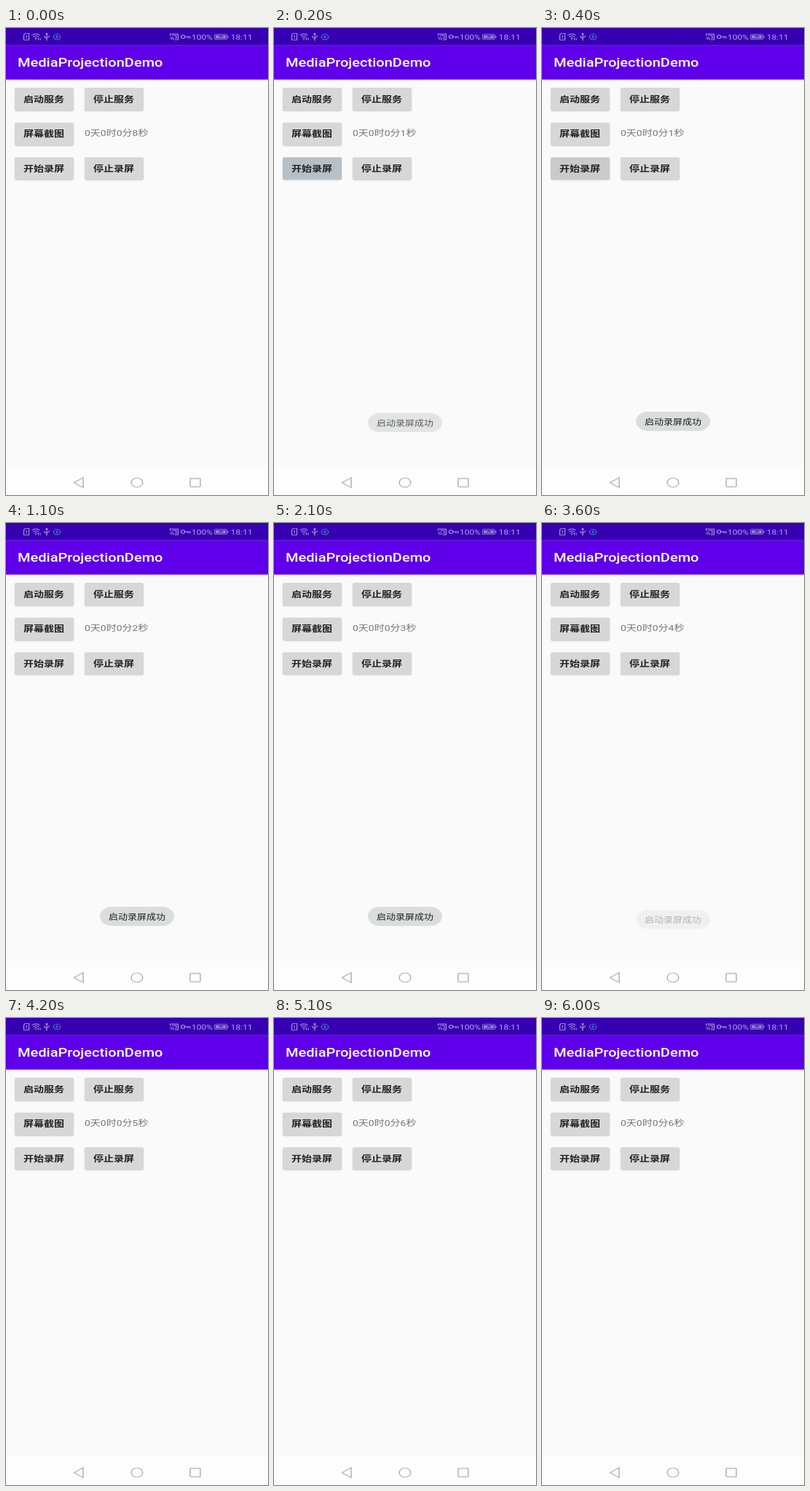
An HTML page for the animation above (6.8 s loop, 360 by 640 pixels).

```html
<!DOCTYPE html>
<html lang="zh-CN">
<head>
<meta charset="utf-8">
<title>MediaProjectionDemo</title>
<style>
@property --sec { syntax: "<integer>"; inherits: false; initial-value: 8; }

html, body { margin: 0; width: 100%; height: 100%; overflow: hidden; background: #fafafa; }

/* A 360 x 780 phone screen, squeezed to the height of the stage */
.screen {
  position: absolute; left: 0; top: 0; width: 360px; height: 780px;
  transform: scaleY(.820513); transform-origin: 0 0;
  font-family: Roboto, "Noto Sans CJK SC", "Noto Sans CJK", sans-serif;
}
.screen > * { position: absolute; box-sizing: border-box; white-space: nowrap; }

.bar {
  left: 0; top: 29.25px; width: 360px; height: 57px; padding-left: 16px;
  background: #6000eb; color: #fff; font-size: 20px; font-weight: 500; line-height: 59px;
  box-shadow: 0 1px 4px rgba(0, 0, 0, .4);
}
.status { left: 0; top: 0; width: 360px; height: 29.25px; background: #3700b3; }
.status text { fill: #b3a8e2; font-size: 12px; }
.nav { left: 0; top: 732px; width: 360px; height: 48px; background: #fdfdfd; }

.button {
  width: 81px; height: 37.5px; border-radius: 2.5px; background: #d6d7d7;
  color: #212121; font-size: 14px; font-weight: 700; line-height: 39px; text-align: center;
  box-shadow: 0 1px 2px rgba(0, 0, 0, .2);
}
.left { left: 11.5px; }
.right { left: 107.5px; }
.row1 { top: 100px; }
.row2 { top: 158px; }
.row3 { top: 215.5px; }
.press { animation: press 6.8s step-end infinite; }

.timer { left: 108px; top: 164.5px; color: #757575; font-size: 14px; line-height: 20px; }
.sec { counter-reset: sec var(--sec); animation: tick 6.8s step-end infinite; }
.sec::after { content: counter(sec); }

.toast {
  left: 129px; top: 641px; width: 102px; height: 32px; border-radius: 16px;
  background: #dadddd; color: #1c1c1c; font-size: 13px; line-height: 33px; text-align: center;
  opacity: 0; animation: toast 6.8s step-end infinite;
}

@keyframes tick {
  0% { --sec: 8; }
  1.47% { --sec: 1; }
  16.17% { --sec: 2; }
  30.88% { --sec: 3; }
  45.58% { --sec: 4; }
  60.29% { --sec: 5; }
  75%, 100% { --sec: 6; }
}
@keyframes press {
  0% { background: #d6d7d7; }
  1.47% { background: #c4cacd; }
  2.94% { background: #b6c0c6; }
  4.41% { background: #c0c5c8; }
  5.88% { background: #c9cacb; }
  7.35% { background: #d0d1d1; }
  10.29%, 100% { background: #d6d7d7; }
}
/* Slides up while fading in, and back down while fading out */
@keyframes toast {
  0% { opacity: 0; transform: none; }
  2.94% { opacity: .72; transform: translateY(2px); }
  4.41% { opacity: .95; transform: translateY(.4px); }
  5.88% { opacity: 1; transform: none; }
  52.94% { opacity: .32; transform: translateY(5px); }
  54.41%, 100% { opacity: 0; transform: none; }
}
</style>
</head>
<body>
<div class="screen">
  <div class="bar">MediaProjectionDemo</div>

  <svg class="status" viewBox="0 0 360 29.25" fill="none" stroke="#a99ddc" stroke-width="1.1">
    <path d="M26.5 9H31.5V20H24.5V11.5ZM28 12V16M28 17.2V18.4"/>
    <path d="M35.5 12.2Q41 7.2 46.5 12.2M37.4 14.8Q41 11.6 44.6 14.8M39.2 17.2Q41 15.6 42.8 17.2M41 18.4V20M44.5 16.5V20M47 16.5V20"/>
    <path d="M56 9V20M54.6 11L56 8.8L57.4 11M52.8 13V15.2L56 17.4M59.2 12.4V14.4L56 16.4M55 20H57"/>
    <g stroke="#3f8fc0"><circle cx="70" cy="14.8" r="4.6"/><path d="M70 12V17.6M67.6 14.8H72.4"/></g>
    <path d="M225.5 12.5V10H236.5V19.5H232M225.5 14.5Q230 15 230.5 19.5M225.5 17Q228 17.5 228.2 19.5M228.5 12.5H234V17H232.5"/>
    <path d="M246 14.6H253V17.6M250 14.6V17.4"/><circle cx="243.2" cy="14.6" r="2.7"/>
    <text x="255" y="19" stroke="none">100%</text>
    <rect x="286.5" y="10.5" width="17" height="8.5" rx="1.5" stroke="#8f82d0"/>
    <rect x="288" y="12" width="14" height="5.5" fill="#8f82d0" stroke="none"/>
    <path d="M305 13V16.5"/>
    <path d="M292 15H295L294.5 13.2L298.5 14.8H295.5" stroke="#4a20b4"/>
    <text x="308.8" y="19" stroke="none">18:11</text>
  </svg>

  <div class="button left row1">启动服务</div>
  <div class="button right row1">停止服务</div>
  <div class="button left row2">屏幕截图</div>
  <div class="timer">0天0时0分<span class="sec"></span>秒</div>
  <div class="button left row3 press">开始录屏</div>
  <div class="button right row3">停止录屏</div>

  <div class="toast">启动录屏成功</div>

  <svg class="nav" viewBox="0 732 360 48" fill="none" stroke="#adadad" stroke-width="1.4">
    <path d="M106 751V767.5L93.5 759.3Z"/>
    <circle cx="180" cy="759.3" r="7.8"/>
    <rect x="253" y="752.3" width="14" height="14" rx="1"/>
  </svg>
</div>
</body>
</html>
```
